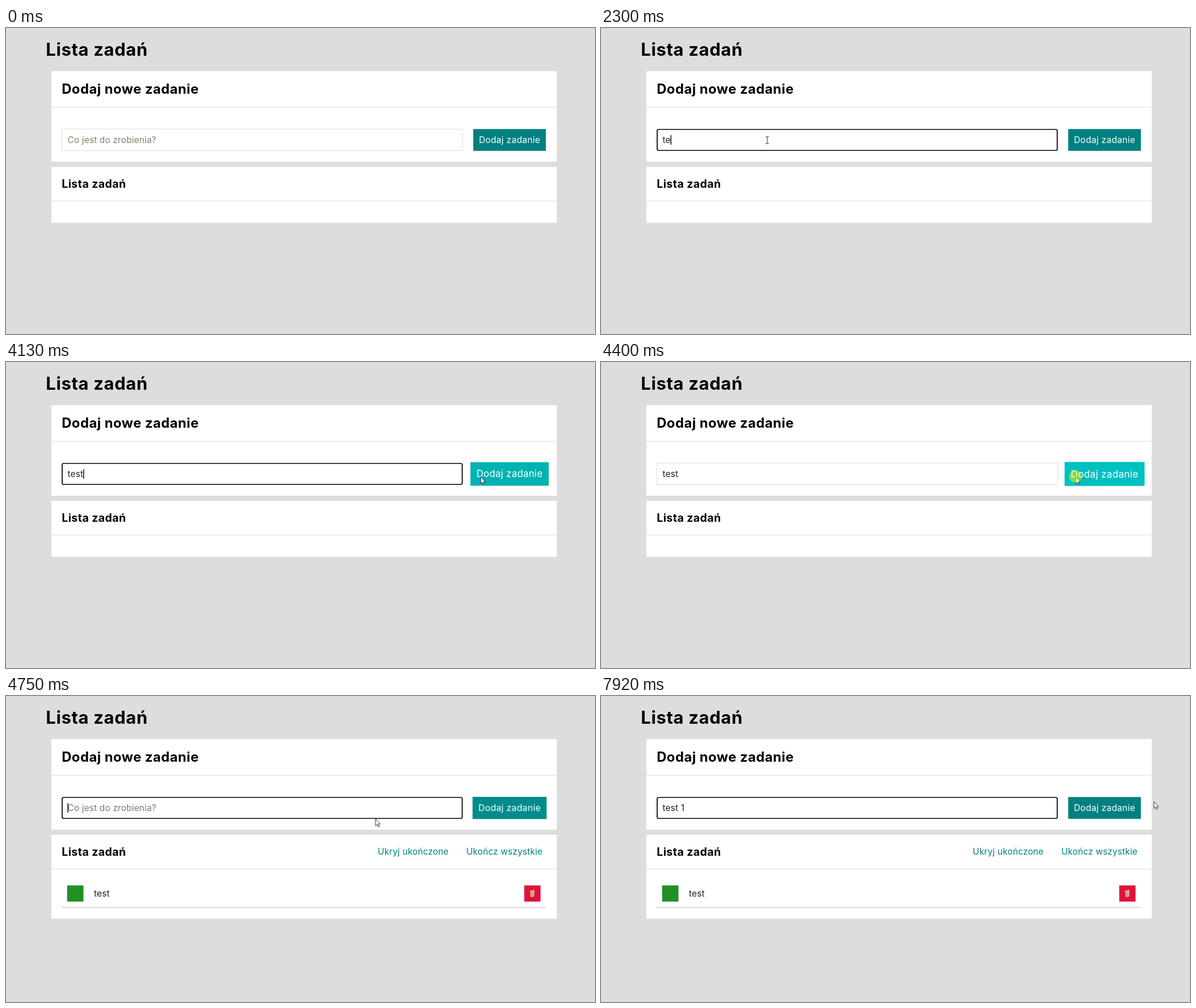
Recreate the animation shown at these times as an HTML page. Size 1038 by 540 pixels, loop 7990 ms.

```html
<!DOCTYPE html>
<html lang="pl">
<meta charset="utf-8">
<title>Lista zadań</title>
<style>
  html, body { margin: 0; height: 100%; overflow: hidden; background: #dcdedd; }
  svg { display: block; width: 100%; height: 100%; }
  text { font: 15.5px Inter, "Open Sans", sans-serif; letter-spacing: .008em; fill: #222; white-space: pre; }
  .bold { font-weight: 700; letter-spacing: .02em; fill: #000; }
  .line { fill: #ddd; }
  .link { fill: teal; }
</style>
<svg viewBox="0 0 1038 540">
  <text class="bold" style="font-size:31px" x="70.3" y="48.5">Lista zadań</text>

  <rect x="80" y="76" width="890.5" height="160" fill="#fff"/>
  <text class="bold" style="font-size:23.8px" x="98.2" y="115.5">Dodaj nowe zadanie</text>
  <rect class="line" x="80" y="139.4" width="890.5" height="1.1"/>
  <rect id="box" fill="#fff"/>
  <text id="hint" x="108.5" y="203">Co jest do zrobienia?</text>
  <text id="typed" x="108.5" y="203"></text>
  <rect id="caret" y="189" width="1.4" height="17"/>
  <g id="button">
    <rect id="face" x="823.4" y="178.3" width="128.1" height="38.5"/>
    <text x="887.5" y="203" text-anchor="middle" style="fill:#fff;letter-spacing:.02em">Dodaj zadanie</text>
  </g>

  <rect id="card" x="80" y="245" width="890.5" fill="#fff"/>
  <text class="bold" style="font-size:19.6px" x="98.2" y="281.5">Lista zadań</text>
  <rect class="line" x="80" y="304.7" width="890.5" height="1.1"/>
  <g id="list">
    <text class="link" x="655" y="280">Ukryj ukończone</text>
    <text class="link" x="945.5" y="280" text-anchor="end">Ukończ wszystkie</text>
    <rect x="107.7" y="334.3" width="28.8" height="28.5" fill="#228f22"/>
    <text x="155" y="354">test</text>
    <rect x="913.3" y="334.3" width="28.7" height="28.5" fill="#dc143c"/>
    <path d="M923.5 343.5l6.5-1.5 1.5 1-1 10.5-1.5 1h-4.5z" fill="#e3b9a0"/>
    <path d="M923.5 343.5l7.5 1M926 346v7M928.5 346v7" stroke="#a9644f" stroke-width=".8"/>
    <rect x="98.5" y="372.4" width="853" height="1.8" fill="#d4d4d4"/>
  </g>

  <g id="cursor">
    <path id="arrow" d="M.5 .5V12.5L3.3 10 5.2 14.3 7 13.5 5.2 9.3H8.7Z" fill="#fff" stroke="#222" stroke-width=".9"/>
    <path id="beam" d="M-3-6H3M-3 6H3M0-6V6" fill="none" stroke="#333"/>
    <circle id="press" r="11" fill="#ff0" fill-opacity=".45"/>
  </g>
</svg>
<script>
const LOOP = 7990, TICK = 67, BLINK = 540, FADE = 300;
const FOCUS = 1370, ENTER = 3970, PRESS = 4400, ADD = 4470, LEAVE = 4580;

// key presses; the field is cleared at ADD
const keys = [2170, 2300, 2500, 2630, 5560, 5610, 5820, 5950, 6630, 6900];

// pointer glides: start, duration, end point
const glides = [
  [250, 140, 340, 425], [720, 450, 296, 198], [FOCUS, 0, 293, 198],
  [3160, 210, 725, 223], [3720, 140, 793, 222], [3930, 140, 836, 202],
  [4540, 210, 651, 216.6], [4820, 210, 638, 209.5],
  [7430, 0, 968, 176], [7520, 0, 1038, 186], [7850, 70, 974, 186]
];

const $ = id => document.getElementById(id);
const set = (id, attrs) => { for (const k in attrs) $(id).setAttribute(k, attrs[k]); };
const show = (id, on) => set(id, { visibility: on ? "visible" : "hidden" });
const within = (t, start, end) => t >= start && t < end;
const smooth = u => u * u * (3 - 2 * u);
const fade = ms => 1 - (1 - Math.max(0, Math.min(1, ms / FADE))) ** 2;

// the pointer is only redrawn once per TICK
function pointer(t) {
  let x = 580, y = 560;
  for (const [start, length, endX, endY] of glides) {
    if (t < start) break;
    const steps = Math.round(length / TICK) + 1;
    const step = Math.floor((t - start) / TICK) + 1;
    const u = smooth(Math.min(1, step / steps));
    x += (endX - x) * u;
    y += (endY - y) * u;
  }
  return [x, y];
}

function draw(t) {
  const added = t >= ADD;
  const pressed = within(t, PRESS, ADD);
  const focus = t >= FOCUS && !pressed;
  const hits = keys.filter(k => k <= t && k > ADD === added);
  const text = "test 1".slice(0, hits.length);
  const active = hits.pop() || (added ? ADD : FOCUS);

  set("box", focus
    ? { x: 99, y: 179, width: 705, height: 37, rx: 2.5, stroke: "#000", "stroke-width": 1.7 }
    : { x: 98.5, y: 178.5, width: 706, height: 38, rx: 0, stroke: "#ddd", "stroke-width": 1 });
  show("hint", !text);
  set("hint", { style: `fill:${focus ? "#797979" : "#80806a"}` });
  $("typed").textContent = text;
  show("caret", focus && Math.floor((t - active) / BLINK) % 2 === 0);
  set("caret", { x: 108.4 + (text ? $("typed").getComputedTextLength() : 0) });

  const hover = fade(t - ENTER) - fade(t - LEAVE);
  const shade = Math.round(128 + 64 * hover);
  set("face", { fill: `rgb(0,${shade},${shade})` });
  set("button", { transform: `translate(887.4 197.5) scale(${1 + .1 * hover}) translate(-887.4 -197.5)` });

  show("list", added);
  set("card", { height: added ? 148 : 98.7 });

  const [x, y] = pointer(t);
  const overField = within(x, 98, 805) && within(y, 178, 216.5);
  set("cursor", { transform: `translate(${x} ${y})` });
  show("arrow", !overField);
  show("beam", overField);
  show("press", pressed || within(t, FOCUS, FOCUS + 70));
}

function tick() {
  draw(performance.now() % LOOP);
  requestAnimationFrame(tick);
}
tick();
</script>
</html>
```
